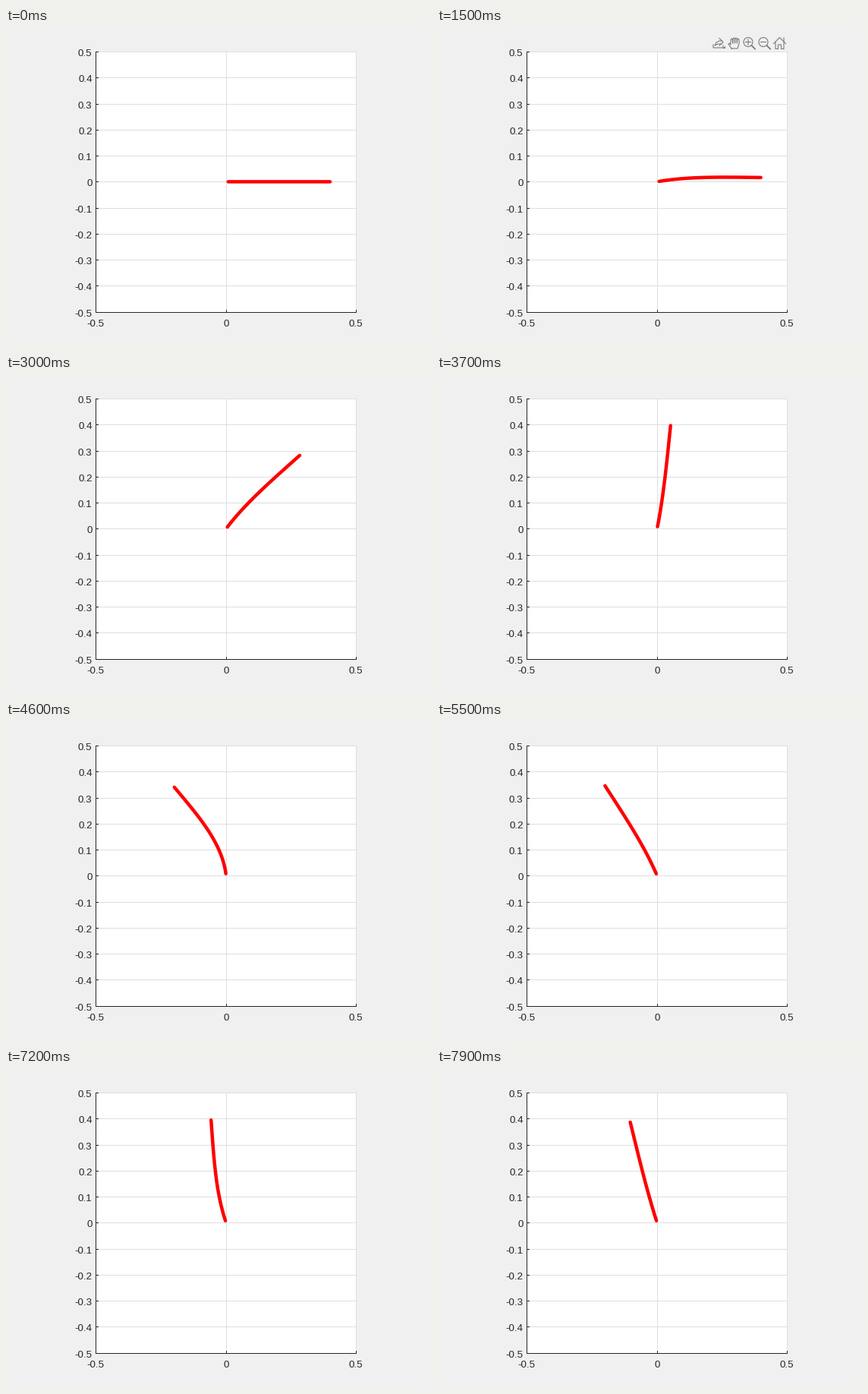
Write a matplotlib script that moves like this. It is 560x420 px and loops after 8000 ms.

```python
import math

import numpy as np
import matplotlib.pyplot as plt
from matplotlib.animation import FuncAnimation
from matplotlib.patches import Circle

W, H, DPI = 560, 420, 100
PX = 72 / DPI                      # points per pixel
STEP, FRAMES, START = 100, 80, 600
CX, CY, SCALE = 290, 202.4, 342.6
ROD, DOTS, POWER = 0.4, 50, 2.5
FLEX = 60                          # bend (deg) per unit of angular acceleration
TOOLBAR = (1500, 1900)             # visible from / until, ms

# Torque pulses on the hub: centre and width (steps), change of speed (deg/step)
PULSES = [(22.8, 6.65, 5.85), (46.5, 5.5, -7.9), (70.1, 5.5, 3.65)]


def pose(t):
    """Chord angle and bend: each Gaussian pulse integrated twice."""
    chord = bend = 0
    if t >= START:
        for centre, width, speed in PULSES:
            z = (t / STEP - centre) / width
            bell = math.exp(-z * z / 2) / math.sqrt(2 * math.pi)
            done = (1 + math.erf(z / math.sqrt(2))) / 2
            chord += speed * width * (bell + z * done)
            bend += FLEX * speed * bell / width
    return chord, bend


def rod(t):
    """Pixel path of the flexible arm."""
    chord, bend = pose(t)
    hub = chord + bend * (1 - 1 / (POWER + 1))
    s = (np.arange(DOTS) + 0.5) / DOTS
    angle = np.radians(hub - bend * (1 - (1 - s) ** POWER))
    ds = ROD * SCALE / DOTS
    return CX + np.cumsum(np.cos(angle)) * ds, CY - np.cumsum(np.sin(angle)) * ds


fig = plt.figure(figsize=(W / DPI, H / DPI), dpi=DPI, facecolor="#f0f0f0")
ax = fig.add_axes([0, 0, 1, 1])
ax.set_xlim(0, W)
ax.set_ylim(H, 0)
ax.axis("off")


def line(xs, ys, color, width=1, **kw):
    return ax.plot(xs, ys, color=color, lw=width * PX, snap=False, **kw)[0]


def label(x, y, text, ha):
    ax.text(x, y, text, ha=ha, va="baseline", color="#262626",
            family="Liberation Sans", size=13.33 * PX)


DARK, GRID = "#262626", "#dedede"
LEFT, RIGHT, TOP, BOTTOM = 118.5, 461.5, 31.5, 374.5
cols = [LEFT, 290.5, RIGHT]
rows = [math.floor(TOP + 34.25 * k) + 0.5 for k in range(11)]

ax.fill([LEFT, RIGHT, RIGHT, LEFT], [TOP, TOP, BOTTOM, BOTTOM],
        color="white", lw=0, snap=False)
for x in cols:
    line([x, x], [TOP, BOTTOM], GRID)
for y in rows:
    line([LEFT, RIGHT], [y, y], GRID)
line([LEFT, LEFT], [TOP, BOTTOM], DARK)
line([LEFT, RIGHT], [BOTTOM, BOTTOM], DARK)
for k, y in enumerate(rows):
    line([LEFT, LEFT + 3], [y, y], DARK)
    label(113.6, y + 5.5, f"{(5 - k) / 10:g}".replace("\u2212", "-"), "right")
for k, x in enumerate(cols):
    line([x, x], [BOTTOM, BOTTOM - 3], DARK)
    label(x - 0.5, 393, f"{(k - 1) / 2:g}", "center")

ICON = "#7a7a7a"
tools = []


def stroke(*pts, width=1.1):
    xs, ys = zip(*pts)
    tools.append(line(xs, ys, ICON, width, solid_joinstyle="round"))


def share_icon(x):
    stroke((x - 7, 22), (x - 7, 26), (x + 6, 26), (x + 6, 23))
    stroke((x + 4, 17), (x + 1, 17), (x - 3, 19), (x - 5, 23), (x - 1, 21), (x + 4, 21))
    stroke((x + 1, 13.5), (x + 6, 18.5), (x + 1, 23))
    tools.extend(ax.fill([x + 5, x + 9, x + 9], [27, 27, 23.5], color=ICON, lw=0))


def hand_icon(x):
    pts = [(x - 3, 27), (x - 7, 21), (x - 5.5, 20), (x - 4, 22)]
    for k in range(4):
        left, tip = x - 4 + 2.8 * k, 12.5 + abs(k - 1.5)
        pts += [(left, 20), (left + 0.3, tip + 1), (left + 1.3, tip),
                (left + 2.4, tip + 1), (left + 2.8, 20)]
    stroke(*pts, (x + 5, 27), pts[0])


def zoom_icon(x, plus):
    ring = Circle((x - 1, 18.5), 6, fill=False, ec=ICON, lw=1.1 * PX)
    tools.append(ax.add_patch(ring))
    stroke((x + 3.5, 23), (x + 8, 27.5), width=1.8)
    stroke((x - 4.5, 18.5), (x + 2.5, 18.5))
    if plus:
        stroke((x - 1, 15), (x - 1, 22))


def home_icon(x):
    stroke((x - 8, 20.5), (x, 12.5), (x + 8, 20.5))
    stroke((x - 5.5, 18.5), (x - 5.5, 27.5), (x - 2, 27.5), (x - 2, 22),
           (x + 2, 22), (x + 2, 27.5), (x + 5.5, 27.5), (x + 5.5, 13))


share_icon(371)
hand_icon(391)
zoom_icon(411, True)
zoom_icon(431, False)
home_icon(451.5)

arm = line([], [], "red", 4.5, solid_capstyle="round", solid_joinstyle="round")


def draw(i):
    t = i * STEP
    arm.set_data(*rod(t))
    for part in tools:
        part.set_visible(TOOLBAR[0] <= t < TOOLBAR[1])
    return [arm, *tools]


anim = FuncAnimation(fig, draw, frames=FRAMES, interval=STEP,
                     init_func=lambda: draw(0), repeat=True, repeat_delay=0)
plt.show()
```
